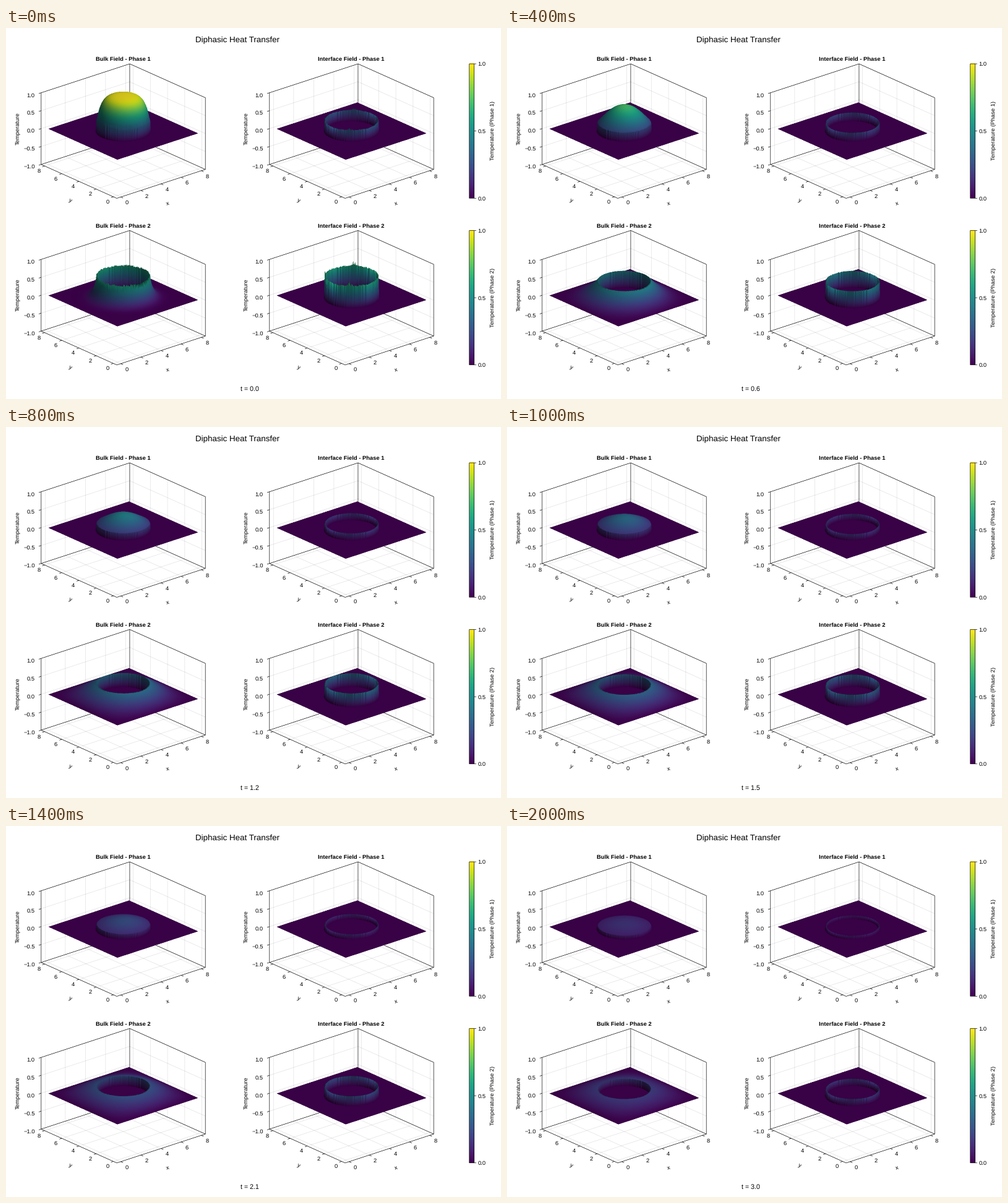
Animation, 800 px wide and 600 px high, one loop 2100 ms. Source, as a matplotlib script:

```python
import numpy as np
import matplotlib
import matplotlib.pyplot as plt
from matplotlib.animation import FuncAnimation
from matplotlib.collections import LineCollection
from matplotlib.patches import Rectangle

matplotlib.rcParams.update({
    "font.family": "Liberation Sans",
    "text.hinting": "no_hinting",
    "axes.unicode_minus": True,
})

FRAMES, DT, FIRST_DT = 21, 0.15, 0.1
SIDE, N, R = 8.0, 161, 2.0
H = SIDE / (N - 1)
SMALL, MID, BIG = 28 / 3, 32 / 3, 40 / 3      # text sizes in px
LW = 0.48                                     # 2/3 px in points

# ---------- camera ----------
AZ, EL, SCALE = 1.275 * np.pi, np.pi / 8, 21.39
ZS = 8.8 / 3                                  # world height of one z unit
RIGHT = np.array([-np.sin(AZ), np.cos(AZ), 0])
UP = np.array([-np.cos(AZ) * np.sin(EL), -np.sin(AZ) * np.sin(EL), np.cos(EL)])
VIEW = np.array([np.cos(AZ) * np.cos(EL), np.sin(AZ) * np.cos(EL), np.sin(EL)])
LIGHT = 0.457 * RIGHT + 0.629 * UP + 0.629 * VIEW
CX, CY = 189.5, 166.7
PANELS = [(0, 0), (369, 0), (0, 269.5), (369, 269.5)]


def project(x, y, z):
    """Data coordinates to pixels inside the first panel."""
    p = np.array([x - 4, y - 4, z * ZS])
    return np.array([CX + SCALE * (RIGHT @ p), CY - SCALE * (UP @ p)])


# ---------- two-phase diffusion ----------
axis = np.arange(N) * H - SIDE / 2
gx, gy = np.meshgrid(axis, axis, indexing="ij")
rad = np.hypot(gx, gy)
near = np.hypot(np.maximum(abs(gx) - H / 2, 0), np.maximum(abs(gy) - H / 2, 0))
far = np.hypot(abs(gx) + H / 2, abs(gy) + H / 2)
inside, outside = near < R, far > R
cut = inside & outside

phi = np.clip((R - rad) / H + 0.5, 0, 1)
cap = 1 - 0.5 * phi
inner = np.zeros((N, N))
inner[1:-1, 1:-1] = 1


def face(a, b):
    return 2 * a * b / (a + b) / H**2


kx = face(cap[1:], cap[:-1])
ky = face(cap[:, 1:], cap[:, :-1])


def operator(u, dt):
    out = cap * u
    out[1:-1] -= dt * np.diff(kx * np.diff(u, axis=0), axis=0)
    out[:, 1:-1] -= dt * np.diff(ky * np.diff(u, axis=1), axis=1)
    return out * inner


def implicit_step(u, dt):
    """One backward Euler step, solved by conjugate gradients."""
    x = u.copy()
    r = cap * u * inner - operator(x, dt)
    p, rr = r.copy(), np.sum(r * r)
    for _ in range(160):
        if rr < 1e-9:
            break
        ap = operator(p, dt)
        a = rr / np.sum(p * ap)
        x += a * p
        r -= a * ap
        new = np.sum(r * r)
        p = r + new / rr * p
        rr = new
    return x


rng = np.random.default_rng(4)
rough = rng.uniform(-1, 1, (N, N))
spike = rng.uniform(-0.2, 1, (N, N))
diagonal = np.exp(-((abs(gx) - abs(gy)) / 0.22) ** 2)


def fields(u, i):
    """Heights of the four surfaces at step i."""
    fade = 0.1**i
    u = np.where(cut, u[abs(rad - R) < H / 2].mean(), u)
    rim = cut * (u + fade * (0.02 * rough + 0.14 * diagonal * spike))
    return (u / 2 * inside,
            rim / 2,
            u * outside + fade * 0.03 * rough * cut,
            rim)


# ---------- surface renderer ----------
SS, X0, Y0, BW, BH, COLUMN = 2, 60, 80, 260, 140, 4


def cell_samples(mask, k):
    i, j = np.nonzero(mask)
    t = (np.arange(k) + 0.5) / k
    a, b = np.meshgrid(t, t)
    shape = (len(i), k * k)
    spread = lambda v: np.broadcast_to(v, shape).ravel()
    return np.array([spread(i[:, None]), spread(j[:, None]),
                     spread(a.ravel()), spread(b.ravel())])


mid = (axis[:-1] + axis[1:]) / 2
wall = abs(np.hypot(mid[:, None], mid[None, :]) - R) < 1.6 * H
si, sj, sa, sb = np.hstack([cell_samples(~wall, 3), cell_samples(wall, 20)])
px, py = (si + sa) * H - 4, (sj + sb) * H - 4
order = np.argsort(VIEW[0] * px + VIEW[1] * py, kind="stable")   # far to near
si, sj, sa, sb, px, py = (v[order] for v in (si, sj, sa, sb, px, py))
base = (si * N + sj).astype(np.int32)
weights = [w.astype(np.float32) for w in
           ((1 - sa) * (1 - sb), (1 - sa) * sb, sa * (1 - sb), sa * sb)]
corners = (0, 1, N, N + 1)
col = ((CX + SCALE * (RIGHT[0] * px + RIGHT[1] * py) - X0) * SS).astype(np.int32)
ground = (CY - SCALE * (UP[0] * px + UP[1] * py) - Y0) * SS
drop = np.arange(COLUMN, dtype=np.int32)
ids = np.repeat(np.arange(len(base), dtype=np.int32), COLUMN)
VIRIDIS = plt.get_cmap("viridis")


def interpolate(f, pick=slice(None)):
    f = f.ravel()
    return sum(f[base[pick] + c] * w[pick] for c, w in zip(corners, weights))


def shading(f):
    dx, dy = np.gradient(f * ZS, H)
    dot = (LIGHT[2] - dx * LIGHT[0] - dy * LIGHT[1]) / np.sqrt(1 + dx**2 + dy**2)
    return (0.38 + 0.55 * np.maximum(dot, 0)).astype(np.float32)


def render(f, shift):
    """Paint short columns far to near, then average down to pixels."""
    f = f.astype(np.float32)
    floor = (ground + shift * SS).astype(np.int32)
    top = ground + shift * SS - SCALE * UP[2] * ZS * SS * interpolate(f)
    top = np.clip(top.astype(np.int32), 0, BH * SS - 1)
    rows = np.minimum(top[:, None] + drop, np.maximum(floor, top)[:, None])
    buf = np.full(BW * BH * SS * SS, -1, np.int32)
    buf[(rows * (BW * SS) + col[:, None]).ravel()] = ids
    seen = buf >= 0
    pick = buf[seen]
    rgba = np.zeros((len(buf), 4))
    rgba[seen] = VIRIDIS(np.clip(interpolate(f, pick), 0, 1))
    rgba[seen, :3] *= interpolate(shading(f), pick)[:, None]
    img = rgba.reshape(BH, SS, BW, SS, 4).mean(axis=(1, 3))
    img[..., :3] /= np.maximum(img[..., 3:], 1e-6)
    return (np.clip(img, 0, 1) * 255).round().astype(np.uint8)


u = phi / cap * inner
images = []
for n in range(FRAMES):
    u = implicit_step(u, DT if n else FIRST_DT)
    images.append([render(f, dy - round(dy))
                   for f, (_, dy) in zip(fields(u, n), PANELS)])

# ---------- stage ----------
fig = plt.figure(figsize=(8, 6), dpi=100, facecolor="white")
ax = fig.add_axes([0, 0, 1, 1])
ax.axis("off")


def label(x, y, s, size=SMALL, ha="center", **kw):
    """Text whose capitals are centred on y."""
    return ax.text(x, y + 0.36 * size, s, fontsize=size * 0.72, ha=ha,
                   va="baseline", **kw)


def turned(x, y, s, angle):
    ax.text(x, y, s, fontsize=SMALL * 0.72, ha="center", va="center",
            rotation=angle, rotation_mode="anchor" if len(s) == 1 else "default")


def lines(segments, color, z):
    ax.add_collection(LineCollection(segments, colors=[color], linewidths=LW,
                                     zorder=z, snap=False), autolim=False)


def unit(v):
    return v / np.hypot(*v)


LO, HI = -0.4, 8.4
XT, ZT = (0, 2, 4, 6, 8), (-1, -0.5, 0, 0.5, 1)
TO_X = unit(project(0, 0, 0) - project(1, 0, 0))
TO_Y = unit(project(0, 0, 0) - project(0, 1, 0))


def frame(dx, dy, title):
    off = np.array([dx, dy])
    pt = lambda *p: project(*p) + off
    path = lambda *ps: np.array([pt(*p) for p in ps])

    grid = []
    for t in XT:
        grid.append(path((t, LO, -1), (t, HI, -1), (t, HI, 1)))
        grid.append(path((LO, t, -1), (HI, t, -1), (HI, t, 1)))
    for t in ZT[1:-1]:
        grid.append(path((LO, HI, t), (HI, HI, t), (HI, LO, t)))
    lines(grid, (0, 0, 0, 0.12), 1)

    edges = [path((LO, HI, 1), (HI, HI, 1), (HI, LO, 1), (HI, LO, -1),
                  (LO, LO, -1), (LO, HI, -1), (LO, HI, 1)),
             path((LO, HI, -1), (HI, HI, -1), (HI, LO, -1)),
             path((HI, HI, -1), (HI, HI, 1))]
    for t in XT:
        p, q = pt(t, LO, -1), pt(LO, t, -1)
        edges += [np.array([p, p + 4 * TO_Y]), np.array([q, q + 4 * TO_X])]
        p, q = p + 7.33 * TO_Y, q + 7.33 * TO_X
        label(p[0], p[1] + 5.5, str(t), ha="left")
        label(q[0], q[1] + 5.2, str(t), ha="right")
    for t in ZT:
        p = pt(LO, HI, t)
        edges.append(np.array([p, p + 4 * TO_X]))
        p = p + 10.67 * TO_X
        label(p[0], p[1], f"{t:.1f}".replace("-", "\u2212"), ha="right")
    lines(edges, "black", 2)

    label(189 + dx, 50 + dy, title, weight="bold")
    turned(261 + dx, 284 + dy, "x", 18)
    turned(104 + dx, 279.5 + dy, "y", -24)
    turned(19.5 + dx, 162.5 + dy, "Temperature", 90)


def colorbar(dy, phase):
    left, right, top, bottom = 748.7, 756.7, 58 + dy, 275.3 + dy
    ax.imshow(VIRIDIS(np.linspace(1, 0, 217))[:, None, :], aspect="auto",
              extent=(left, right, bottom, top), zorder=1)
    ax.add_patch(Rectangle((left, top), right - left, bottom - top, fill=False,
                           lw=LW, ec="black", zorder=2, snap=False))
    for t in (0, 0.5, 1):
        y = bottom + (top - bottom) * t
        lines([[(right, y), (right + 3.3, y)]], "black", 2)
        label(762.5, y, f"{t:.1f}", ha="left")
    turned(786.5, 166.5 + dy, f"Temperature (Phase {phase})", 90)


titles = [f"{kind} Field - Phase {p}" for p in (1, 2) for kind in ("Bulk", "Interface")]
surfaces = []
for (dx, dy), title, img in zip(PANELS, titles, images[0]):
    frame(dx, dy, title)
    x, y = X0 + dx, Y0 + round(dy)
    surfaces.append(ax.imshow(img, extent=(x, x + BW, y + BH, y), aspect="auto",
                              interpolation="none", zorder=3))
colorbar(0, 1)
colorbar(269.5, 2)
label(374, 18.5, "Diphasic Heat Transfer", BIG)
clock = label(394, 583, "", MID)
ax.set_xlim(0, 800)
ax.set_ylim(600, 0)


def update(i):
    for surface, img in zip(surfaces, images[i]):
        surface.set_data(img)
    clock.set_text(f"t = {round(i * DT, 2)}")
    return [*surfaces, clock]


anim = FuncAnimation(fig, update, frames=FRAMES, interval=100, repeat=True,
                     repeat_delay=0, blit=False)
plt.show()
```
